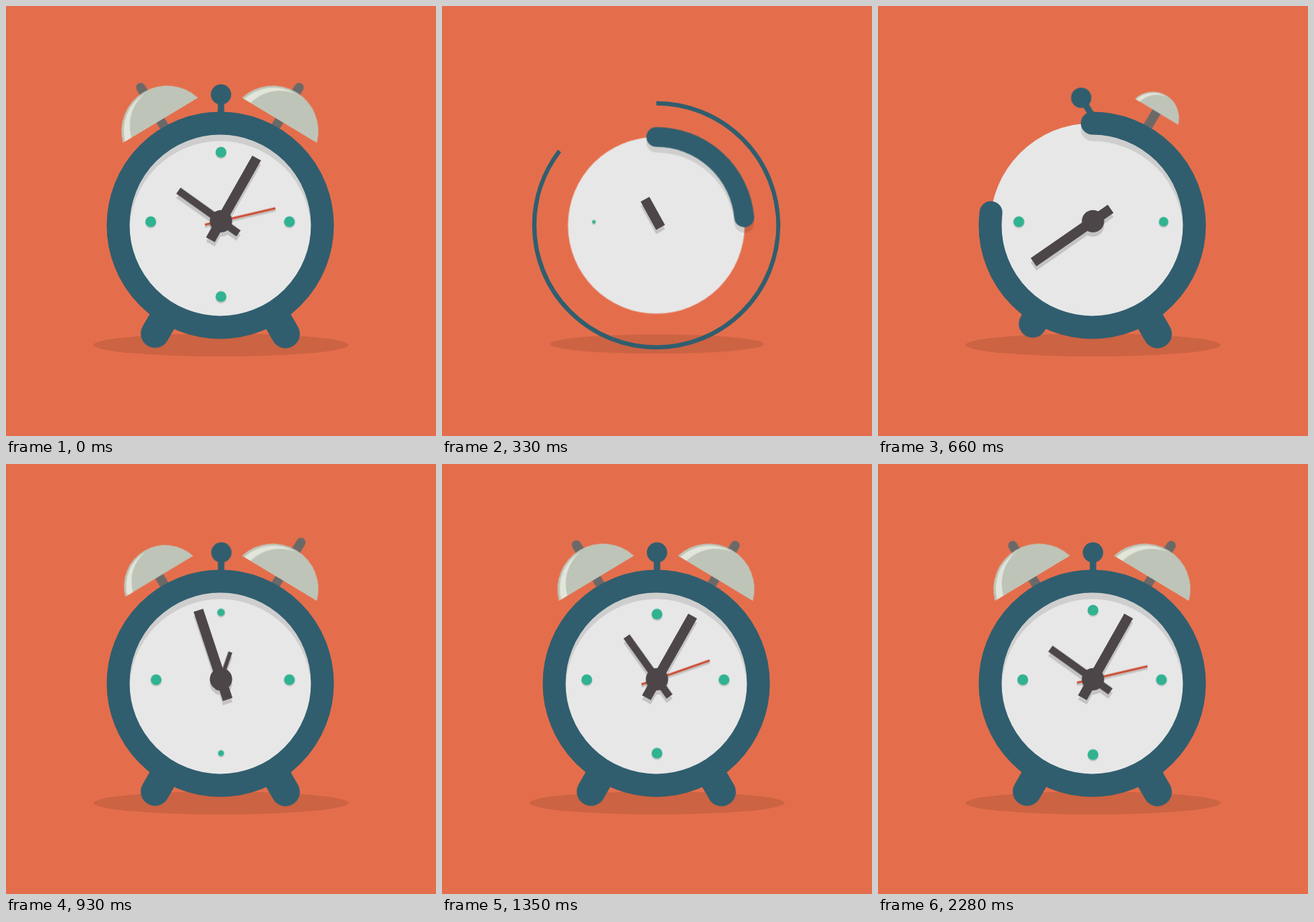
Recreate the animation shown at these times as an HTML page without scripts. Size 600 by 600 pixels, loop 2.58 s.

```html
<!DOCTYPE html>
<html lang="en">
<head>
<meta charset="utf-8">
<title>Alarm clock</title>
<style>
html, body { margin: 0; width: 100%; height: 100%; overflow: hidden; background: #e46e4c; }
svg { display: block; width: 100vw; height: 100vh; }

/* The loop opens on the last 30 ms of the cycle, then builds the clock. */
.a { animation: 2580ms linear -2550ms infinite; }
.body { fill: #305e6e; }
.line { fill: none; stroke: #305e6e; }
.hand { fill: #4d4649; }
.cast { filter: drop-shadow(0 6px 0 rgba(0, 0, 0, .15)); }
.cast.low { filter: drop-shadow(0 3px 0 rgba(0, 0, 0, .15)); }
.cast.dots { filter: drop-shadow(0 2px 0 rgba(0, 0, 0, .13)); fill: #31b291; }

.floor { animation-name: floor; }
.face { animation-name: face; }
.trim { animation-name: trim; }
.wave { animation-name: wave; }
.unwind { animation-name: unwind; }
.foot-l { animation-name: foot-l; }
.foot-r { animation-name: foot-r; }
.knob { animation-name: knob; }
.stem-l { animation-name: stem-l; }
.stem-r { animation-name: stem-r; }
.bell-l { animation-name: bell-l; }
.bell-r { animation-name: bell-r; }
.cap { animation-name: cap; }
.min-turn { animation-name: min-turn; }
.min-grow { animation-name: min-grow; }
.hour-turn { animation-name: hour-turn; }
.hour-grow { animation-name: hour-grow; }
.second { animation-name: second; }
.dot-l { animation-name: dot-l; }
.dot-r { animation-name: dot-r; }
.dot-t { animation-name: dot-t; }
.dot-b { animation-name: dot-b; }
.foot-l, .foot-r, .knob, .stem-l, .stem-r, .bell-l, .bell-r, .cap { animation-timing-function: ease-out; }
.dot-l, .dot-r, .dot-t, .dot-b { animation-timing-function: ease-in-out; }

@keyframes floor {
  0% { transform: scale(0); animation-timing-function: cubic-bezier(.333, .667, .667, 1); }
  19.5%, 100% { transform: scale(1); }
}
@keyframes face {
  0% { transform: scale(0); animation-timing-function: cubic-bezier(.333, .667, .667, 1); }
  18.45%, 100% { transform: scale(1); }
}
@keyframes trim {
  0% { stroke-dasharray: 0 400; animation-timing-function: cubic-bezier(.37, 0, .63, 1); }
  36.05%, 100% { stroke-dasharray: 361 400; }
}
@keyframes wave {
  0% { transform: scale(0); animation-timing-function: cubic-bezier(.333, .667, .667, 1); }
  16.05%, 100% { transform: scale(1); }
}
@keyframes unwind {
  0% { stroke-dasharray: 360 400; animation-timing-function: cubic-bezier(.333, 0, .667, 0); }
  22.17%, 100% { stroke-dasharray: 0 400; }
}
@keyframes foot-l {
  0%, 22.09% { transform: translateY(-45px) scale(0); }
  24.42% { transform: translateY(-16px) scale(.97); }
  27.91%, 100% { transform: none; }
}
@keyframes foot-r {
  0%, 17.44% { transform: translateY(-45px) scale(0); }
  19.77% { transform: translateY(-16px) scale(.97); }
  23.26%, 100% { transform: none; }
}
@keyframes knob {
  0%, 20.93% { transform: rotate(-80deg) scale(0); }
  24.42% { transform: rotate(-32deg); }
  29.07% { transform: rotate(12deg); }
  32.2% { transform: rotate(-4deg); }
  34.88% { transform: rotate(1deg); }
  38.37%, 100% { transform: none; }
}
@keyframes stem-r {
  0%, 19.77% { transform: scaleY(0); }
  24.42% { transform: scaleY(.7); }
  29.07% { transform: scaleY(.88); }
  34.88% { transform: scaleY(1.06); }
  41.86%, 100% { transform: none; }
}
@keyframes stem-l {
  0%, 29.07% { transform: scaleY(0); }
  34.88% { transform: scaleY(.8); }
  43% { transform: scaleY(1.06); }
  51.16% { transform: scaleY(1.01); }
  54%, 100% { transform: none; }
}
@keyframes bell-r {
  0%, 20.93% { transform: scale(0); }
  24.42% { transform: scale(.57); }
  29.07% { transform: scale(1.07); }
  32.56%, 100% { transform: none; }
}
@keyframes bell-l {
  0%, 30.23% { transform: scale(0); }
  34.88% { transform: scale(.9); }
  37.6% { transform: scale(1.05); }
  40.7%, 100% { transform: none; }
}
@keyframes cap {
  0%, 12.79% { transform: scale(0); }
  18.6% { transform: scale(1.1); }
  22.09%, 100% { transform: none; }
}
@keyframes min-turn {
  0%, 6.98% { transform: rotate(-173deg); animation-timing-function: cubic-bezier(.333, .611, .667, .881); }
  34.88% { transform: rotate(341.5deg); animation-timing-function: cubic-bezier(.333, .667, .667, 1); }
  49.61%, 100% { transform: rotate(389.5deg); }
}
@keyframes min-grow {
  0%, 6.98% { transform: scaleY(0); }
  11.63% { transform: scaleY(.34); }
  20.93%, 100% { transform: none; }
}
@keyframes hour-turn {
  0%, 31.78% { transform: rotate(34deg); animation-timing-function: cubic-bezier(.333, .667, .667, 1); }
  67.91%, 100% { transform: rotate(-54.5deg); }
}
@keyframes hour-grow {
  0%, 31.78% { transform: scale(0); }
  34.88% { transform: scale(.54); }
  38.37%, 100% { transform: none; }
}
@keyframes second {
  0%, 38.37% { transform: rotate(-100deg) scale(0); animation-timing-function: ease-out; }
  48.84%, 83.72% { transform: rotate(-19.4deg); }
  84.88% { transform: rotate(-16deg); }
  86.05% { transform: rotate(-12deg); }
  87.21%, 100% { transform: rotate(-13.1deg); }
}
@keyframes dot-l {
  0%, 10.47% { transform: translateX(14px) scale(0); animation-timing-function: linear; }
  11.63% { transform: translateX(10px) scale(.33); }
  24.42% { transform: translateX(-5.5px); }
  34.88% { transform: translateX(7.5px); }
  43% { transform: translateX(-2px); }
  51.16%, 100% { transform: none; }
}
@keyframes dot-r {
  0%, 20.93% { transform: translateX(-16px) scale(0); }
  24.42% { transform: translateX(3px) scale(.87); }
  29.07% { transform: translateX(4px); }
  34.88% { transform: none; }
  51.16% { transform: translateX(-2px); }
  60%, 100% { transform: none; }
}
@keyframes dot-t {
  0%, 31.4% { transform: translateY(14px) scale(0); }
  34.88% { transform: translateY(3px) scale(.7); }
  41.86% { transform: translateY(-5px); }
  51.16% { transform: translateY(5.5px); }
  60% { transform: translateY(-2px); }
  65.12% { transform: translateY(-1px); }
  75.58%, 100% { transform: none; }
}
@keyframes dot-b {
  0%, 32.56% { transform: translateY(-10px) scale(0); }
  34.88% { transform: translateY(-2px) scale(.55); }
  42.5% { transform: translateY(1px); }
  51.16% { transform: translateY(-2px); }
  60%, 65.12% { transform: translateY(1px); }
  75.58%, 100% { transform: none; }
}
</style>
</head>
<body>
<svg viewBox="0 0 600 600">
  <defs>
    <clipPath id="disc"><circle r="158.5"/></clipPath>
    <rect id="stem" x="-6.5" y="-85" width="13" height="92" rx="6.5" fill="#6b6868"/>
    <g id="bell" transform="translate(0 33)">
      <path d="M-61 0A63.5 63.5 0 0 1 61 0z" fill="#bfc4b8"/>
      <path d="M-57.5 0A61 61 0 0 1 0 -43.5Q-36 -36 -47.5 0z" fill="#e2e5d9"/>
    </g>
    <line id="foot" class="line" y1="-40" stroke-width="40" stroke-linecap="round"/>
    <circle id="dot" r="7.6"/>
  </defs>

  <rect width="600" height="600" fill="#e46e4c"/>
  <g transform="translate(300 465)">
    <ellipse class="a floor" cy="8" rx="178" ry="16" fill="#cc6343"/>
  </g>

  <g transform="translate(208 457) rotate(30)"><g class="a foot-l"><use href="#foot"/></g></g>
  <g transform="translate(390 457.5) rotate(-30)"><g class="a foot-r"><use href="#foot"/></g></g>

  <g transform="translate(215.5 159.5) rotate(-31)">
    <g transform="translate(0 25)"><g class="a stem-l"><use href="#stem"/></g></g>
    <g transform="translate(0 -33)"><g class="a bell-l"><use href="#bell"/></g></g>
  </g>
  <g transform="translate(381.5 159.5) rotate(31)">
    <g transform="translate(0 25)"><g class="a stem-r"><use href="#stem"/></g></g>
    <g transform="translate(0 -33)"><g class="a bell-r"><use href="#bell"/></g></g>
  </g>

  <g transform="translate(300 155)">
    <g class="a knob body">
      <rect x="-4.5" y="-30" width="9" height="34"/>
      <circle cy="-31.5" r="14.2"/>
    </g>
  </g>

  <g transform="translate(299 306)">
    <g class="a wave">
      <circle class="a unwind line" r="184" pathLength="360" stroke-width="6.5" transform="rotate(-90)"/>
    </g>
    <g class="a face">
      <circle r="142.5" fill="#e7e7e7"/>
      <g clip-path="url(#disc)">
        <circle class="a trim" r="142.5" pathLength="360" fill="none" stroke="#000" stroke-opacity=".11"
          stroke-width="32" stroke-linecap="round" transform="translate(0 9) rotate(-90)"/>
      </g>
      <circle class="a trim line" r="142.5" pathLength="360" stroke-width="32" stroke-linecap="round" transform="rotate(-90)"/>
    </g>
  </g>

  <g class="cast dots">
    <g transform="translate(202 301)"><g class="a dot-l"><use href="#dot"/></g></g>
    <g transform="translate(395.5 301)"><g class="a dot-r"><use href="#dot"/></g></g>
    <g transform="translate(300 204)"><g class="a dot-t"><use href="#dot"/></g></g>
    <g transform="translate(300 405.5)"><g class="a dot-b"><use href="#dot"/></g></g>
  </g>

  <g transform="translate(300 300)">
    <g class="cast low">
      <rect class="a second" x="-23" y="-1.5" width="101" height="3" fill="#c9482f"/>
    </g>
    <g class="cast">
      <g class="a hour-turn"><rect class="a hour-grow hand" x="-5.2" y="-73" width="10.4" height="103"/></g>
      <g class="a min-turn"><rect class="a min-grow hand" x="-7" y="-101" width="14" height="131"/></g>
      <circle class="a cap hand" cy=".3" r="15.6"/>
    </g>
  </g>
</svg>
</body>
</html>
```
